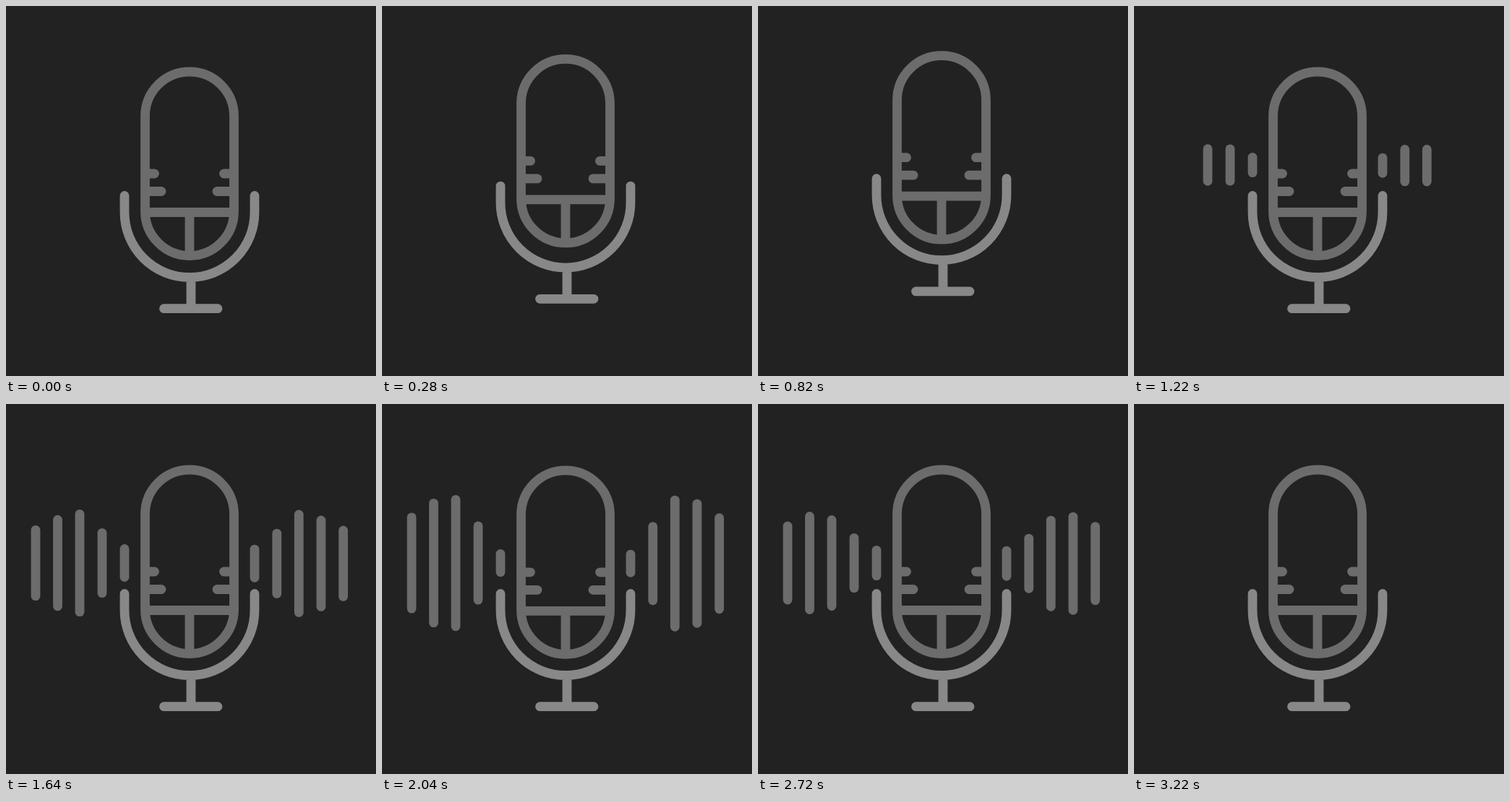
Animation, 512 px wide and 512 px high, one loop 3240 ms. Source, as an HTML page:

```html
<!DOCTYPE html>
<html lang="en">
<head>
<meta charset="utf-8">
<title>Microphone</title>
<style>
  html, body { margin: 0; width: 100%; height: 100%; overflow: hidden; background: #222; }
  svg { display: block; width: 100vw; height: 100vh; }
  g { fill: none; stroke-width: 12.8; stroke-linecap: round; }
</style>
</head>
<body>
<svg viewBox="0 0 512 512">
  <g id="bars" stroke="#6c6c6c"></g>
  <g id="stand" stroke="#888">
    <path d="M164 262.5V285.5A90 90 0 0 0 344 285.5V262.5M256 376V418.7M218.5 418.7H293"/>
  </g>
  <g id="capsule" stroke="#6c6c6c">
    <rect x="192.5" y="91" width="123" height="254.5" rx="61.5"/>
    <path d="M193 232H205.5M193 256.5H215M315 232H301.5M315 256.5H292M193 285.5H315M254 285.5V345"/>
  </g>
</svg>
<script>
const LOOP = 3240;
const BAR_WIDTH = 12.8;
const $ = id => document.getElementById(id);
const clamp01 = x => Math.min(1, Math.max(0, x));
const smooth = x => (1 - Math.cos(Math.PI * x)) / 2;
const easeOut = x => Math.sin(Math.PI * x / 2);
const part = (t, from, to) => clamp01((t - from) / (to - from));

// Bars from the innermost pair outwards: half heights at the key times.
const KEY_TIMES = [1100, 1220, 1620, 2040, 2380, 2720, 3190];
const bars = [
  { x: [164, 344], sizes: [0, 17, 26, 19, 16, 24, 0] },
  { x: [133, 374.8], sizes: [0, 28.5, 48, 57.5, 68, 41, 0] },
  { x: [102, 405.3], sizes: [0, 28.5, 74, 94, 103, 66, 0] },
  { x: [71.5, 436], sizes: [0, 0, 66, 89, 96, 71, 0] },
  { x: [41, 466.7], sizes: [0, 0, 52, 69.5, 78, 57.5, 0] }
];

for (const bar of bars) {
  bar.lines = bar.x.map(x => {
    const line = document.createElementNS("http://www.w3.org/2000/svg", "line");
    line.setAttribute("x1", x);
    line.setAttribute("x2", x);
    return $("bars").appendChild(line);
  });
}

function halfHeight({ sizes }, t) {
  const next = KEY_TIMES.findIndex(time => time > t);
  if (next < 1) return 0;
  const p = part(t, KEY_TIMES[next - 1], KEY_TIMES[next]);
  const eased = t < 1620 ? easeOut(p) : smooth(p);
  return sizes[next - 1] + (sizes[next] - sizes[next - 1]) * eased;
}

function drawBar(bar, t) {
  const half = halfHeight(bar, t);
  const reach = Math.max(0, half - BAR_WIDTH / 2);
  bar.lines.forEach((line, side) => {
    const y = 220 + side * 0.7;
    line.setAttribute("y1", y - reach);
    line.setAttribute("y2", y + reach);
    line.style.strokeWidth = Math.min(BAR_WIDTH, 2 * half);
    line.style.display = half > 0.3 ? "" : "none";
  });
}

const shift = (id, y) => $(id).setAttribute("transform", `translate(0 ${y})`);

function draw(t) {
  const rise = smooth(part(t, 0, 640));
  const settle = Math.sin(Math.PI * part(t, 1760, 2160));
  shift("capsule", -43.5 * rise * (1 - easeOut(part(t, 640, 1200))) + settle);
  shift("stand", -33 * rise * (1 - smooth(part(t, 640, 1150))));
  bars.forEach(bar => drawBar(bar, t));
}

const begin = performance.now();
function tick() {
  draw((performance.now() - begin) % LOOP);
  requestAnimationFrame(tick);
}
tick();
</script>
</body>
</html>
```
